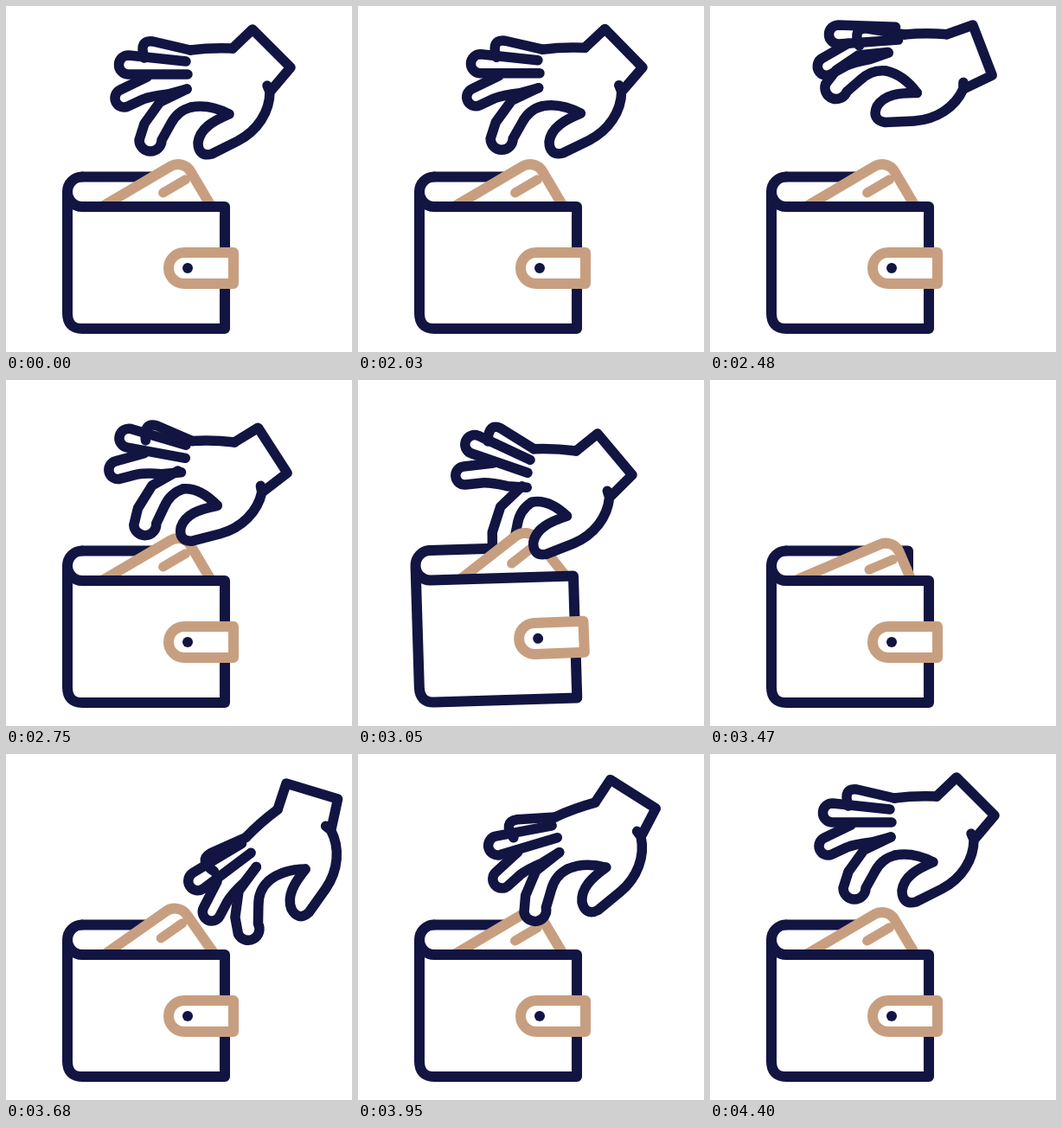
Recreate the animation shown at these times as an HTML page. Size 400 by 400 pixels, loop 4430 ms.

```html
<!DOCTYPE html>
<html lang="en">
<head>
<meta charset="utf-8">
<title>Wallet and hand</title>
<style>
  html, body { margin: 0; width: 100%; height: 100%; overflow: hidden; background: #fff; }
  svg { display: block; width: 100vw; height: 100vh; }
  .ink { stroke: #121442; }
  .tan { stroke: #c79f80; }
  .ink, .tan { stroke-width: 12; stroke-linecap: round; stroke-linejoin: round; fill: none; }
  .hand { stroke-width: 11.5; }
  .white { fill: #fff; }
</style>
</head>
<body>
<svg viewBox="0 0 400 400">
  <defs>
    <g id="card" class="tan">
      <rect class="white" x="-67" y="-49" width="134" height="98" rx="17"/>
      <path d="M27-27H57" stroke-width="11"/>
    </g>
  </defs>
  <g class="wallet"><path id="flap" class="ink" d="M88 197.500H229V228.500"/></g>
  <use id="spare" href="#card"/>
  <g class="ink hand">
    <g id="index"><path class="white" d="M214 117Q198 121 190 137L180 155A13 13 0 0 1 154 155L160 136L178 111L209 96"/></g>
    <path id="web"/>
    <g id="palm">
      <path d="M213 51Q236 48 262 49"/>
      <path id="ring" d="M160 60Q153 39 170 41L213 51"/>
    </g>
    <path id="middle" d="M208 64L142 57A11 11 0 0 0 141 79H210"/>
    <path id="fore" d="M163 82L132 97A10.500 10.500 0 0 0 141 116L158 108Q168 104 187 102L209 96"/>
    <path d="M262 49L285 27L329 71L307 97"/>
  </g>
  <use id="held" href="#card"/>
  <g class="wallet">
    <path class="white" d="M71 232H253V373H88Q71 373 71 355Z"/>
    <path class="ink" d="M253 232H88A17 17.250 0 0 1 88 197.500M253 232V373H88Q71 373 71 355V215"/>
    <g id="clasp">
      <path class="tan white" d="M263 285H206A18 18 0 0 0 206 321H263Z"/>
      <circle cx="210" cy="303" r="6" fill="#121442"/>
    </g>
  </g>
  <g class="ink hand">
    <path class="white" d="M302 92L305 99C305 122 291 144 268 156L238 171C227 174 222 168 222 158C224 142 239 133 258 125"/>
  </g>
</svg>
<script>
const LOOP = 4430;
const $ = id => document.getElementById(id);

// Hand pose: cuff x, cuff y, turn, palm bend, finger spread, index bend.
const rest = [307, 49, 0, 0, 0, 0];
const pinch = [315, 53, 24, -22, -6, -4];
const grab = [297, 86, 5, 0, 14, -23];
const lift = [345.5, 27, 36.5, 0, 14, -37];
const swing = [354, 43, -28, -11, 2, 0];
const shift = ([x, y, ...bends], dx, dy) => [x + dx, y + dy, ...bends];

const hand = [
  [2000, ...rest],
  [2330, ...shift(pinch, 0, -16)],
  [2500, ...pinch],
  [2930, ...shift(grab, 4, 6)],
  [3050, ...grab],
  [3260, ...lift],
  [3400, ...shift(lift, 175, -227)],
  [3500, ...shift(swing, 260, 110)],
  [3680, ...swing],
  [4190, ...rest]
];

// Cards: x, y, turn.
const tucked = [172, 253, -30.5];
const held = [
  [2930, ...tucked], [3050, 173, 250, -38], [3260, 162, 111, -17], [3400, 337, -116, -17]
];
const spare = [
  [3050, 172, 300, 0], [3260, 167, 265, -6.5], [3680, 172.5, 250.5, -35], [3980, ...tucked]
];

// Wallet: lean, extra clasp turn, visible length of the rear flap.
const wallet = [
  [3000, 0, 0, 102], [3180, -9, -4, 172], [3260, -7, -6, 172], [3450, 0, 0, 172], [3600, 0, 0, 102]
];

// Smooth interpolation through the keys without overshoot.
function sample(keys, t) {
  const last = keys.length - 1;
  if (t <= keys[0][0]) return keys[0].slice(1);
  if (t >= keys[last][0]) return keys[last].slice(1);
  const i = keys.findIndex(k => k[0] > t) - 1;
  const a = keys[i], b = keys[i + 1], h = b[0] - a[0], u = (t - a[0]) / h;
  const slope = (j, k) => j < 0 || j >= last ? 0 :
    (keys[j + 1][k] - keys[j][k]) / (keys[j + 1][0] - keys[j][0]);
  const mean = (p, q) => p * q > 0 ? 2 * p * q / (p + q) : 0;
  return a.slice(1).map((from, n) => {
    const k = n + 1, s = slope(i, k), d = b[k] - from;
    const m = h * mean(slope(i - 1, k), s), e = h * mean(s, slope(i + 1, k));
    return from + u * (m + u * (3 * d - 2 * m - e + u * (m + e - 2 * d)));
  });
}

const turn = (el, angle, x, y) => el.setAttribute('transform', `rotate(${angle} ${x} ${y})`);
const place = (id, [x, y, angle]) =>
  $(id).setAttribute('transform', `translate(${x} ${y}) rotate(${angle})`);

const joint = [204, 110];
function swivel(x, y, angle) {
  const r = angle * Math.PI / 180, c = Math.cos(r), s = Math.sin(r);
  const dx = x - joint[0], dy = y - joint[1];
  return `${joint[0] + dx * c - dy * s} ${joint[1] + dx * s + dy * c}`;
}

const hands = document.querySelectorAll('.hand');
const wallets = document.querySelectorAll('.wallet');

function drawHand([x, y, angle, palm, spread, index]) {
  const pose = `translate(${x} ${y}) rotate(${angle}) translate(${-rest[0]} ${-rest[1]})`;
  hands.forEach(h => h.setAttribute('transform', pose));
  turn($('palm'), palm, 262, 49);
  turn($('ring'), spread, 213, 51);
  turn($('middle'), palm + spread, 209, 72);
  turn($('fore'), palm + spread, 209, 96);
  turn($('index'), index, ...joint);
  $('web').setAttribute('d', `M258 125Q${swivel(235, 113, index / 2)} ${swivel(214, 117, index)}`);
}

function draw(t) {
  drawHand(sample(hand, t));
  place('held', sample(held, t));
  place('spare', sample(spare, t));
  const [lean, extra, length] = sample(wallet, t);
  wallets.forEach(w => turn(w, lean, 72, 361));
  turn($('clasp'), extra, 210, 303);
  $('flap').setAttribute('stroke-dasharray', `${length} 400`);
}

const start = performance.now();
function tick() {
  draw((performance.now() - start) % LOOP);
  requestAnimationFrame(tick);
}
tick();
</script>
</body>
</html>
```
